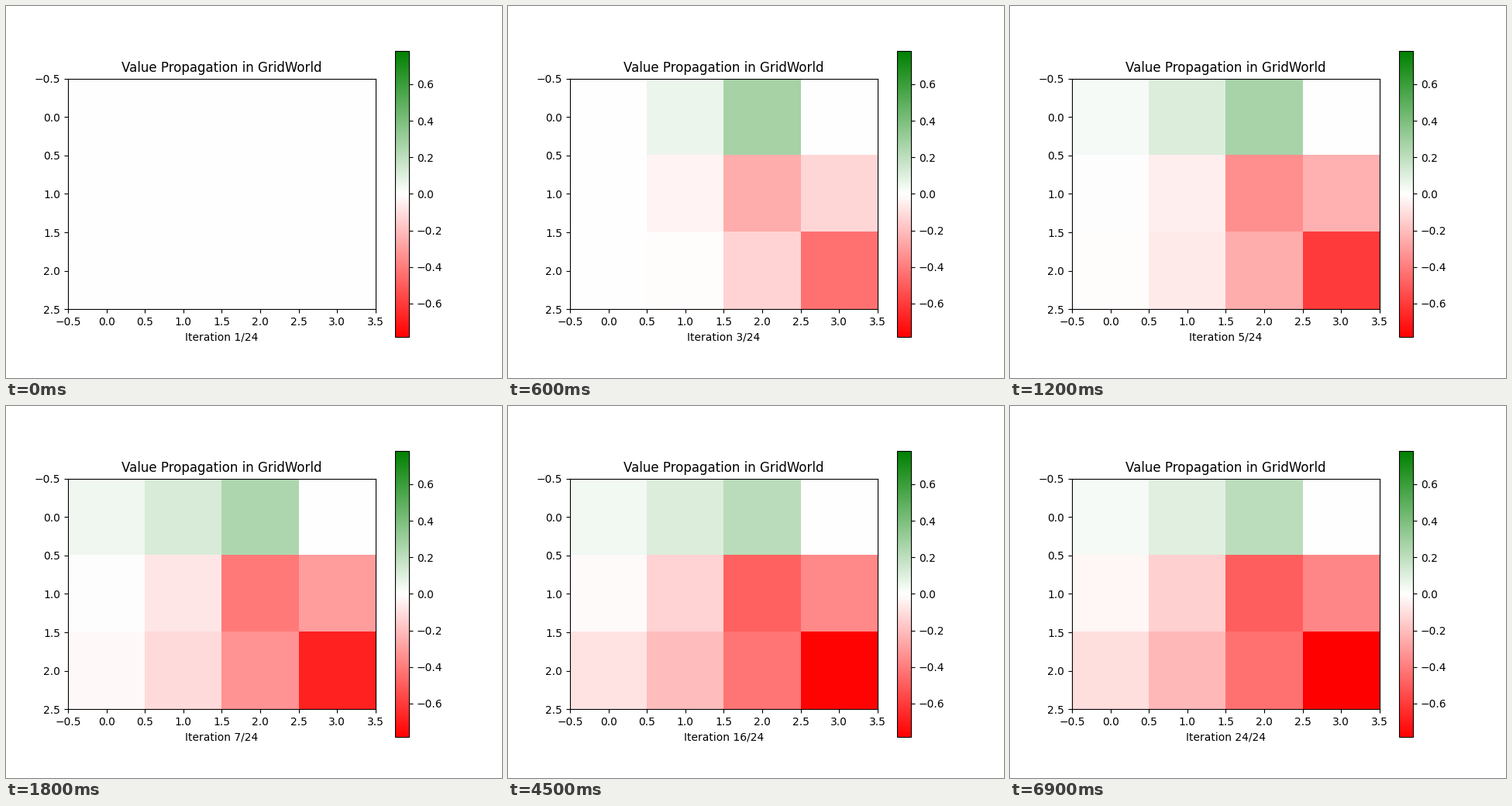
Animation of 640 by 480 pixels, one loop 7.2 s. Source, as a matplotlib script:

```python
import numpy as np
import matplotlib.pyplot as plt
from matplotlib.animation import FuncAnimation
from matplotlib.colors import LinearSegmentedColormap

ROWS, COLS = 3, 4
GOAL, BOMB, WALL = (0, 3), (1, 3), (1, 1)
REWARD = {GOAL: 1.0, BOMB: -1.0}
MOVES = [(-1, 0), (1, 0), (0, -1), (0, 1)]
GAMMA = 0.9
STEPS = 24


def move(state, step):
    r, c = state[0] + step[0], state[1] + step[1]
    inside = 0 <= r < ROWS and 0 <= c < COLS
    return (r, c) if inside and (r, c) != WALL else state


def sweep(values):
    """One in-place evaluation pass of the uniformly random policy."""
    v = values.copy()
    for state in np.ndindex(ROWS, COLS):
        if state == GOAL:
            continue
        nexts = [move(state, m) for m in MOVES]
        v[state] = sum(REWARD.get(n, 0.0) + GAMMA * v[n] for n in nexts) / 4
    return v


history = [np.zeros((ROWS, COLS))]
while len(history) < STEPS:
    history.append(sweep(history[-1]))
limit = np.abs(history).max()

cmap = LinearSegmentedColormap.from_list("rwg", ["red", "white", "green"])
fig, ax = plt.subplots(figsize=(6.4, 4.8), dpi=100)
image = ax.imshow(history[0], cmap=cmap, vmin=-limit, vmax=limit)
fig.colorbar(image, ax=ax)
ax.set_title("Value Propagation in GridWorld")
label = ax.set_xlabel(f"Iteration 1/{STEPS}")


def update(i):
    image.set_data(history[i])
    label.set_text(f"Iteration {i + 1}/{STEPS}")
    return image, label


anim = FuncAnimation(fig, update, frames=STEPS, interval=300,
                     repeat=True, repeat_delay=0, blit=False)
plt.show()
```
